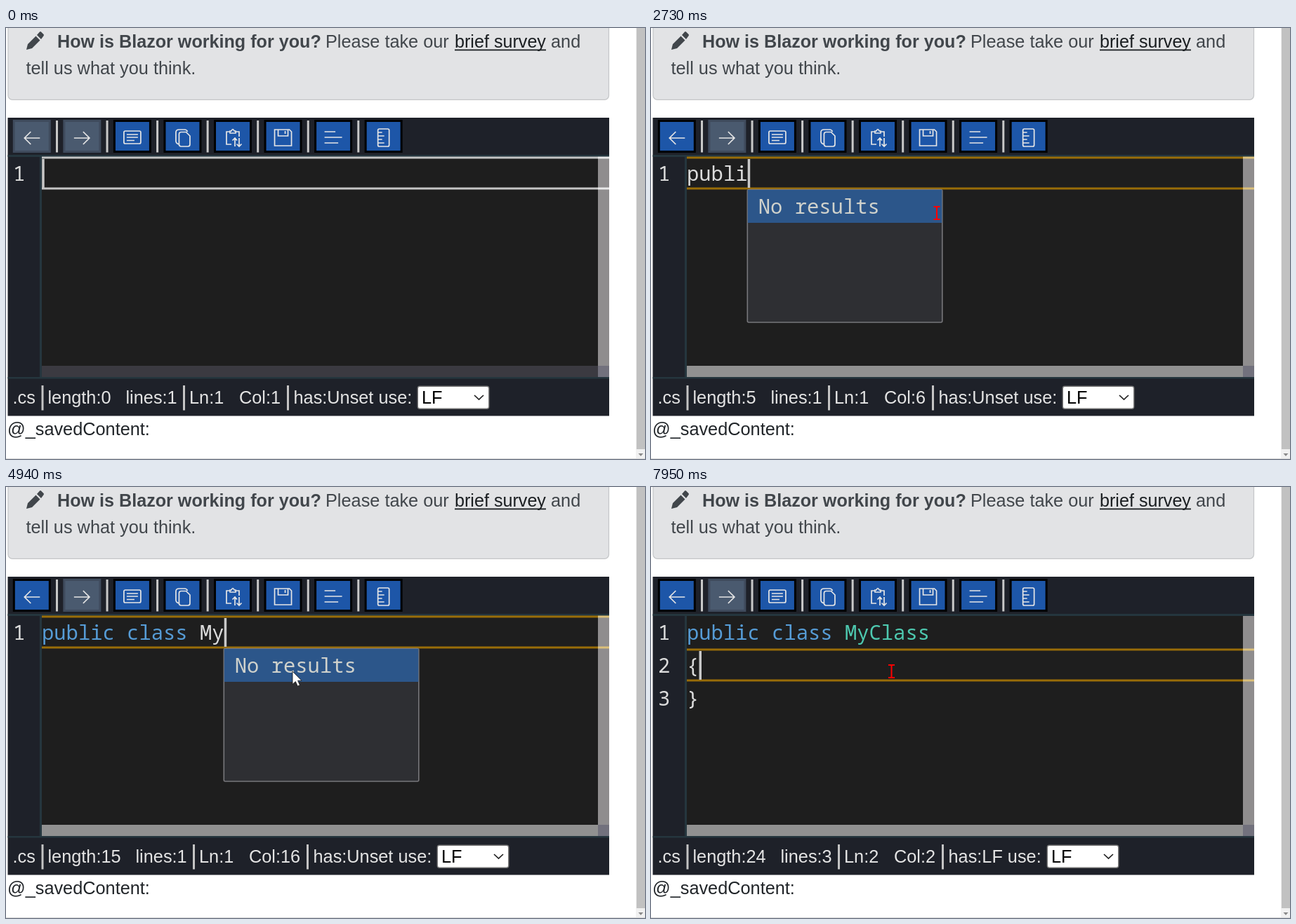
These frames come from a looping animation (910 px wide and 615 px high, 8000 ms). An HTML page:

```html
<!DOCTYPE html>
<html lang="en">
<head>
<meta charset="utf-8">
<title>Code editor typing</title>
<style>
html, body { margin: 0; width: 100%; height: 100%; overflow: hidden; background: #fff; }
svg { display: block; width: 910px; height: 615px; }
text { font: 25.3px "Liberation Sans", Arial, sans-serif; white-space: pre; }
.mono text { font: 28.83px "Noto Sans Mono", monospace; fill: #dcdcdc; }
.bar text { fill: #e4e4e4; }
.bar rect.rule { fill: #c4c4c4; }
.icon { fill: none; stroke: #e6e6e6; stroke-width: 1.7; }
</style>
</head>
<body>
<svg viewBox="0 0 910 615">
  <!-- survey banner -->
  <rect x="3" y="-20" width="855.5" height="122.3" rx="6" fill="#e2e3e5" stroke="#c4c6c8" stroke-width="1.2"/>
  <g fill="#41464b">
    <path d="M29 31L31 23 42.500 11.500 48.500 17.500 37 29ZM44 10L48 5.500Q49 4.500 50 5.500L53.500 9Q54.500 10 53.500 11.200L50 16Z"/>
    <text x="73" y="28" style="font-weight:bold;font-size:25.15px">How is Blazor working for you?</text>
    <text x="455" y="28">Please take our</text>
    <text x="639" y="28" fill="#1a1e21" style="font-size:25.15px">brief survey</text>
    <rect x="639" y="30.500" width="130" height="1.800" fill="#1a1e21"/>
    <text x="776" y="28">and</text>
    <text x="28.500" y="66">tell us what you think.</text>
  </g>
  <text x="2" y="581" fill="#212529">@_savedContent:</text>
  <!-- page scrollbar -->
  <rect x="897" width="13" height="615" fill="#f1f1f1"/>
  <rect x="898" width="12" height="601" fill="#c1c1c1"/>
  <path d="M900.500 607h7l-3.500 4z" fill="#8a8a8a"/>
  <rect y="614" width="910" height="1" fill="#dcdcdc"/>

  <!-- editor -->
  <rect x="2.500" y="128" width="856.500" height="425.500" fill="#1e2129"/>
  <g id="tools"></g>
  <rect x="51" y="184" width="808" height="314" fill="#1e1e1e"/>
  <g fill="#25363e">
    <rect x="2.500" y="181" width="856.500" height="3"/>
    <rect x="48" y="184" width="3" height="314"/>
    <rect x="2.500" y="498" width="856.500" height="2.500"/>
  </g>
  <rect id="hbar" x="51" y="482" width="792" height="16"/>
  <rect x="843" y="184" width="16" height="298" fill="#8f8d8e"/>
  <rect x="843" y="482" width="16" height="16" fill="#72717d"/>
  <g id="row">
    <path id="edge" d="M51 185H843M51 229H843" stroke-width="3"/>
    <path id="edgeEnd" d="M843 185H859M843 229H859" stroke-width="3"/>
  </g>
  <g class="mono" id="code">
    <text y="218" x="51"><tspan id="w0"></tspan><tspan id="w1"></tspan><tspan id="w2"></tspan></text>
    <text id="line2" x="51" y="265"></text>
    <text id="line3" x="51" y="312"></text>
    <text x="10" y="218">1</text>
    <text id="no2" x="10" y="265">2</text>
    <text id="no3" x="10" y="312">3</text>
  </g>
  <rect id="caret" width="3.500" height="41" fill="#c8c8c8"/>
  <g id="menu" class="mono">
    <rect x=".5" y="230.500" width="277.500" height="189.500" rx="2" fill="#2e2f33" stroke="#77777b" stroke-width="1.600"/>
    <rect x="1" y="231" width="276.500" height="47" fill="#2c568a"/>
    <text x="16" y="265" style="fill:#d0d2cc">No results</text>
  </g>

  <!-- status bar -->
  <g class="bar">
    <text x="9.500" y="536">.cs</text>
    <rect class="rule" x="50.500" y="510" width="3" height="35.500"/>
    <text id="len" x="59.500" y="536"></text>
    <g id="mid">
      <text id="lines" x="170.500" y="536"></text>
      <rect class="rule" x="252" y="510" width="3" height="35.500"/>
      <text id="ln" x="261" y="536"></text>
      <text id="col" x="332" y="536"></text>
    </g>
    <g id="end">
      <rect class="rule" x="400" y="510" width="3" height="35.500"/>
      <text id="has" x="409.500" y="536"></text>
      <g id="select">
        <rect x="586.300" y="511.300" width="101.500" height="32" rx="3" fill="#fff" stroke="#767676" stroke-width="1.400"/>
        <text x="592" y="536" style="fill:#000">LF</text>
        <path d="M667 524l6.500 6 6.500-6" fill="none" stroke="#222" stroke-width="1.700"/>
      </g>
    </g>
  </g>

  <path id="arrow" d="M0 0V18.500L4.300 14.600 7.300 21.200 10.500 19.800 7.600 13.300H13Z" fill="#fff" stroke="#111" stroke-width=".8"/>
  <path id="beam" d="M-4.500-9H-1L0-8 1-9H4.500M0-8V8M-4.500 9H-1L0 8 1 9H4.500" fill="none" stroke="#f00" stroke-width="2"/>
</svg>
<script>
const $ = id => document.getElementById(id);
const LOOP = 8000, CELL = 17.3, LINE = 47;
const SCRIPT = 'public class MyClass\n{\n}';
// the moment each character of SCRIPT is typed
const KEYS = [2210, 2350, 2480, 2600, 2730, 2880, 3080,
  3540, 3610, 3680, 4010, 4140, 4410,
  4730, 4940, 5210, 5300, 5400, 5500, 5600, 6070, 6550, 6750, 6950];
const CLICK = 1480, BLINK = 440, UP = 7680;
const WORDS = [[0, 7, 3020, '#569cd6'], [7, 13, 4340, '#569cd6'], [13, 20, 6070, '#4ec9b0']];
// pointer: [time, x, y]; glides first, then hops
const GLIDE = [[90, 885, 622], [1140, 501, 281], [1560, 407, 264]];
const HOPS = [[7470, 353, 268], [7680, 349, 266], [7750, 346.5, 265], [7950, 342.5, 263]];

// icons, drawn around the centre of each button
const ICONS = [
  'M-10.500 1H11.500M-1.500-8L-10.500 1L-1.500 10',
  'M-11.500 1H10.500M1.500-8L10.500 1L1.500 10',
  'M-10-9H10Q12-9 12-7V7Q12 9 10 9H-10Q-12 9-12 7V-7Q-12-9-10-9ZM-8-4H8M-8 0H8M-8 4.500H3',
  'M-5 10Q-9.500 9-9.500 5V-7Q-9.500-11-5-11H3Q6-11 7-8M-2-7.500H5L10.500-2V10Q10.500 13 7.500 13H-2Q-5 13-5 10V-4.500Q-5-7.500-2-7.500Z',
  'M-4-8H-9V10H-2M4-8H9V-1M-4-6V-9H-2Q0-14 2-9H4V-6ZM3 13V1M-.5 4.500L3 1L6 4.500M9 1V13M5.500 9.500L9 13L12.500 9.500',
  'M-12-11H9L12-8V12H-12ZM-7-11V-2H7V-11M3-9V-5',
  'M-12.500-8H3M-12.500 0H12.500M-12.500 8H7',
  'M-6-12H6Q8-12 8-10V11Q8 13 6 13H-6Q-8 13-8 11V-10Q-8-12-6-12ZM-8-7H-2M-8-2H1M-8 3H-2M-8 8H1'
];
$('tools').innerHTML = ICONS.map((d, i) => {
  const x = 36.8 + 71.55 * i;
  const rule = i < 7 ? `<rect x="34.200" y="132" width="3" height="45.500" fill="#c8c8c8"/>` : '';
  return `<g transform="translate(${x})">${rule}
    <rect class="face" x="-25.500" y="132.500" width="51" height="44" stroke-width="3"/>
    <path class="icon" d="${d}" transform="translate(0 156)"/></g>`;
}).join('');
const faces = document.querySelectorAll('.face');
function setButton(i, on) {
  faces[i].setAttribute('fill', on ? '#1d56a8' : '#4a5a6f');
  faces[i].setAttribute('stroke', on ? '#000' : '#3f4b5d');
}
ICONS.forEach((_, i) => setButton(i, i > 1));

const show = (id, on) => $(id).style.display = on ? '' : 'none';
const move = (id, x, y = 0) => $(id).setAttribute('transform', `translate(${x} ${y})`);
const paint = (id, name, color) => $(id).setAttribute(name, color);
const write = (id, s) => $(id).textContent = s;

function pointer(t) {
  const hop = HOPS.filter(h => h[0] <= t).pop();
  if (hop) return hop.slice(1);
  const s = Math.min(90 + Math.floor((t - 90) / 70) * 70, 1560);
  const [a, b] = s < 1140 ? GLIDE : GLIDE.slice(1);
  const k = (s - a[0]) / (b[0] - a[0]);
  return [a[1] + (b[1] - a[1]) * k, a[2] + (b[2] - a[2]) * k];
}

function draw(t) {
  const n = KEYS.filter(k => k <= t).length;
  const lines = SCRIPT.slice(0, n).split('\n');
  const ln = lines.length - (t >= UP ? 1 : 0);
  const col = lines[ln - 1].length;

  WORDS.forEach(([from, to, at, color], i) => {
    write('w' + i, lines[0].slice(from, to));
    $('w' + i).style.fill = t >= at ? color : '#dcdcdc';
  });
  for (const i of [2, 3]) {
    write('line' + i, lines[i - 1] || '');
    show('no' + i, lines.length >= i);
  }

  const focused = t >= CLICK;
  paint('edge', 'stroke', focused ? '#996d08' : '#c4c4c4');
  paint('edgeEnd', 'stroke', focused ? '#dcc07a' : '#e8e8e8');
  move('row', 0, (ln - 1) * LINE);
  move('caret', 51.2 + col * CELL, 187 + (ln - 1) * LINE);
  show('caret', focused || t < BLINK);
  show('menu', ln === 1 && /\w$/.test(lines[0]));
  move('menu', 50.3 + col * CELL);
  setButton(0, n > 0);
  paint('hbar', 'fill', n ? '#919191' : '#3b3a41');

  write('len', 'length:' + n);
  write('lines', 'lines:' + lines.length);
  write('ln', 'Ln:' + ln);
  write('col', 'Col:' + (col + 1));
  const wide = n > 9 ? 14 : 0, broken = lines.length > 1;
  move('mid', wide);
  move('end', wide + (col > 8 ? 14 : 0));
  write('has', `has:${broken ? 'LF' : 'Unset'} use:`);
  move('select', broken ? -36 : 0);

  const [x, y] = pointer(t);
  const inCode = x < 843 && y > 184 && y < 482 && (t < 2810 || t >= 7470);
  show('beam', t >= 90 && inCode);
  show('arrow', t >= 90 && !inCode);
  move('beam', x, y);
  move('arrow', x + 1, y - 1);
}

const start = performance.now();
function tick(now) {
  draw(Math.max(0, now - start) % LOOP);
  requestAnimationFrame(tick);
}
draw(0);
requestAnimationFrame(tick);
</script>
</body>
</html>
```
